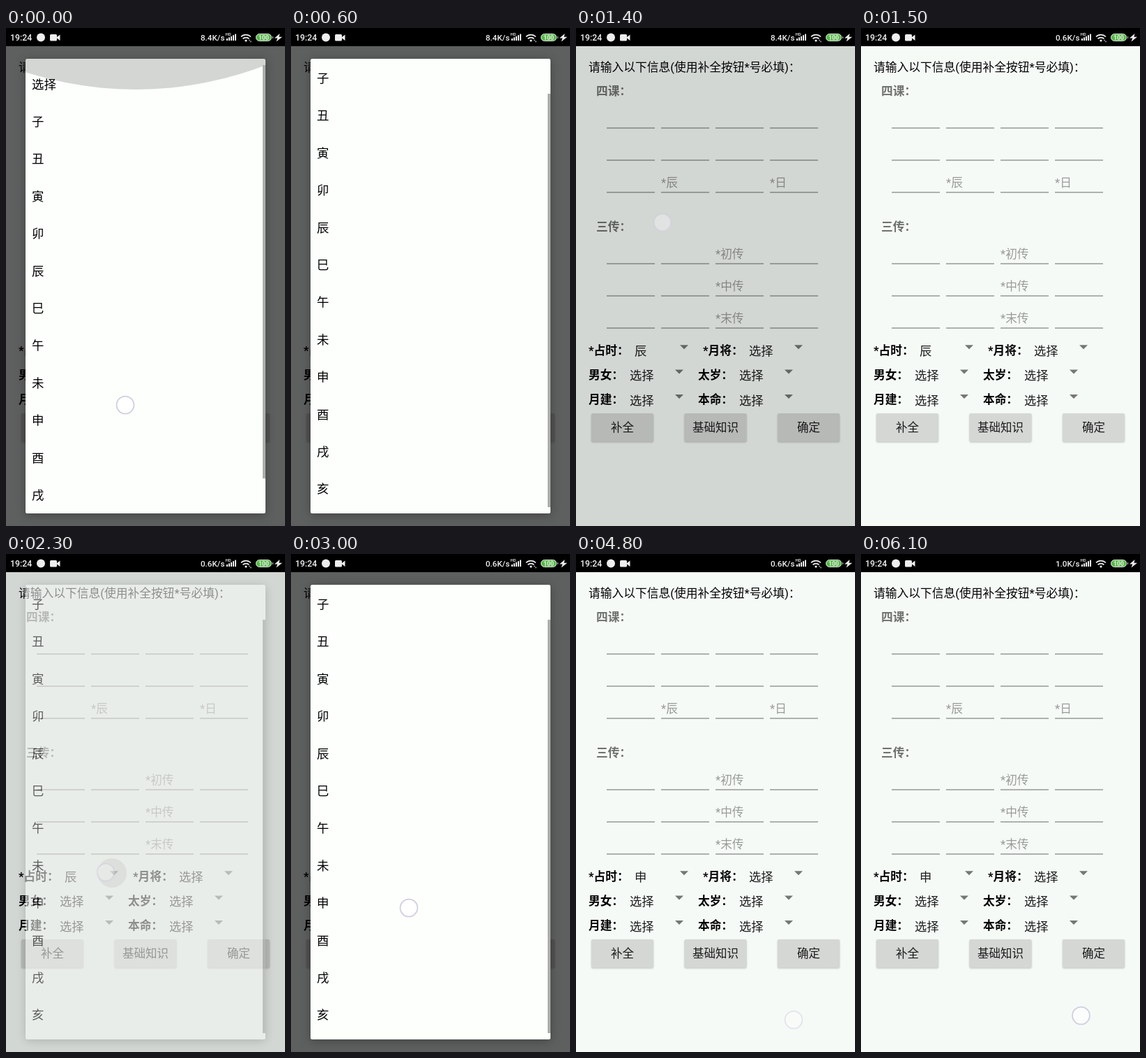
Recreate the animation shown at these times as an HTML page. Size 400x712 px, loop 6.2 s.

```html
<!DOCTYPE html>
<html lang="zh-CN">
<head>
<meta charset="utf-8">
<style>
html, body { margin: 0; width: 100%; height: 100%; overflow: hidden; background: #000; }
svg { display: block; width: 400px; height: 712px; font-family: Roboto, "Noto Sans CJK SC", "Noto Sans CJK", sans-serif; }
.bold { font-weight: bold; }
#status { font-weight: 500; }
#dialog { filter: drop-shadow(0 2px 7px rgba(0,0,0,.3)); }
#buttons rect { filter: drop-shadow(0 1px 1px rgba(0,0,0,.22)); }
</style>
</head>
<body>
<svg viewBox="0 0 400 712">
  <defs><clipPath id="panel"><rect x="28" y="44" width="344" height="650" rx="2.5"/></clipPath></defs>
  <rect y="26" width="400" height="686" fill="#f6faf7"/>
  <g id="form"></g>
  <g id="buttons"></g>
  <circle id="ripple" cx="152" cy="456" fill="#000"/>
  <rect id="dim" y="26" width="400" height="686"/>
  <g id="dialog">
    <g clip-path="url(#panel)">
      <rect x="28" y="44" width="344" height="650" fill="#fcfffc"/>
      <circle id="glow" cx="186" r="515"/>
      <g id="list"></g>
      <rect id="bar" x="368" width="4" height="591" fill="#acaeac"/>
    </g>
  </g>
  <g id="status">
    <rect width="400" height="26"/>
    <g id="icons" fill="#eee">
      <text x="6" y="18" font-size="12.3">19:24</text>
      <circle cx="50" cy="13.5" r="6"/>
      <rect x="63" y="9" width="10" height="9.5" rx="1.5"/>
      <path d="M72 13.7L77.5 9.5V18Z"/>
      <text id="speed" x="313.5" y="17.5" font-size="11.7" text-anchor="end"></text>
      <text x="314.5" y="11" font-size="6">HD</text>
      <circle cx="344" cy="18" r="1.6"/>
      <path d="M337 12.5a10 10 0 0 1 14 0M339.5 15.4a6.4 6.4 0 0 1 9 0" fill="none" stroke="#eee" stroke-width="1.7"/>
      <path id="arrows" d="M348 18.3l1-2 1 2zM350 18.7h2l-1 2z"/>
      <rect x="358.5" y="8.5" width="22" height="10" rx="5" fill="#55b947" stroke="#eee"/>
      <path d="M382 11.5q2 2 0 4z"/>
      <text x="369.5" y="16.8" font-size="8.6" class="bold" text-anchor="middle">100</text>
      <path d="M392.5 8L385 14.5h4.2L387.5 19.5 396 12.7h-4.6z"/>
    </g>
  </g>
  <circle id="touch" r="12.4" fill="#fff" fill-opacity=".6" stroke="#cfcfdf" stroke-width="1.8"/>
</svg>
<script>
const $ = id => document.getElementById(id);
const LOOP = 6200, STEP = 100, ROW = 53.38, MAX_SCROLL = 62, DIM = .615;

function set(el, attrs) {
  for (const k in attrs) el.setAttribute(k, attrs[k]);
}
function add(parent, tag, attrs, content = "") {
  const el = document.createElementNS("http://www.w3.org/2000/svg", tag);
  set(el, attrs);
  el.textContent = content;
  return parent.appendChild(el);
}
// y is the middle of the glyphs
const label = (parent, s, x, y, size = 16.75, fill = "#000", extra = {}) =>
  add(parent, "text", { x, y: y + size * .37, "font-size": size, fill, ...extra }, s);

const form = $("form"), bold = { class: "bold" };
label(form, "请输入以下信息(使用补全按钮*号必填)：", 18, 56);

// A titled block of 3 x 4 input fields; hint(row, column) gives the placeholder
function fields(title, titleY, top, hint) {
  label(form, title, 29, titleY, 16.7, "#6f726f", bold);
  for (let i = 0; i < 12; i++) {
    const row = i >> 2, col = i % 4, x = 44 + 78 * col, y = top + 46 * row;
    add(form, "rect", { x, y: y - .6, width: 69, height: 1.2, fill: "#808380" });
    label(form, hint(row, col), x, y - 14, 16.7, "#989b98");
  }
}
fields("四课：", 90, 143, (row, col) => row == 2 && col % 2 ? "*" + "辰日"[col >> 1] : "");
fields("三传：", 283.5, 337, (row, col) => col == 2 ? `*${"初中末"[row]}传` : "");

// Starred names push everything after them to the right
const values = ["*占时", "*月将", "男女", "太岁", "月建", "本命"].map((name, i) => {
  const star = name[0] == "*" ? 7 : 0;
  const x = i % 2 ? 175 + star : 18, y = 460.5 + 35.3 * (i >> 1);
  label(form, name + "：", x, y, 16.7, "#000", bold);
  add(form, "path", { d: `M${x + 124 + star} ${y - 7.2}h12l-6 6z`, fill: "#747774" });
  return label(form, "选择", x + 59 + star, y + 1, 17.3, "#1c1d1c");
});

["补全", "基础知识", "确定"].forEach((s, i) => {
  const x = 22 + 133.5 * i;
  add($("buttons"), "rect", { x, y: 551, width: 89, height: 40.5, rx: 2, fill: "#d4d7d4" });
  label($("buttons"), s, x + 44.5, 571, 16.5, "#1a1a1a", { "text-anchor": "middle" });
});

["选择", ..."子丑寅卯辰巳午未申酉戌亥"].forEach((s, i) =>
  label($("list"), s, 37, 80.3 + ROW * i, 17.4));

for (let i = 0; i < 5; i++)
  add($("icons"), "rect", { x: 316 + 3 * i, y: 15 - 1.6 * i, width: 2, height: 3 + 1.6 * i });

const ramp = (t, from, to) => Math.min(1, Math.max(0, (t - from) / (to - from)));
const easeOut = p => 1 - (1 - p) ** 2;

// Each ring moves by dx, dy while held, then fades after release
const touches = [
  { at: 0, hold: 300, x: 171, y: 539, dy: -114 },
  { at: 1200, hold: 100, x: 124, y: 278 },
  { at: 2200, hold: 0, x: 143, y: 455 },
  { at: 3000, hold: 200, x: 169, y: 506 },
  { at: 4500, hold: 200, x: 265, y: 666, dx: 47 },
  { at: 6000, hold: 200, x: 315.5, y: 660 }
];

function draw(t) {
  const second = t >= 2200;
  const opened = second ? ramp(t, 2200, 2380) : 1;
  const closing = second ? 3100 : 1200;
  set($("dialog"), { opacity: opened * (1 - ramp(t, closing, closing + 200)) });
  set($("dim"), { opacity: DIM * opened ** 2.5 * (1 - ramp(t, closing, closing + 260)) });

  const scroll = easeOut(ramp(t, 0, 500)), pull = 1 - ramp(t, 0, 400);
  set($("list"), { transform: `translate(0 ${-MAX_SCROLL * scroll})` });
  set($("bar"), { y: 53 + 41 * scroll, opacity: second ? 1 : 1 - ramp(t, 700, 1100) });
  set($("glow"), { cy: -471 + 44 * pull, opacity: .16 * pull });
  set($("ripple"), {
    r: 12 + 9 * ramp(t, 2200, 2300),
    opacity: second && t < 2400 ? .15 : 0
  });

  values[0].textContent = t < 3200 ? "辰" : "申";
  $("speed").textContent = (t < 1500 ? "8.4" : t < 5400 ? "0.6" : "1.0") + "K/s";
  set($("arrows"), { opacity: t < 5200 ? 1 : 0 });

  const { at, hold, x, y, dx = 0, dy = 0 } = touches.findLast(touch => touch.at <= t);
  const moved = ramp(t, at, at + hold), release = at + hold;
  set($("touch"), {
    cx: x + dx * moved,
    cy: y + dy * moved,
    opacity: 1 - ramp(t, release, release + 200)
  });
}

const begin = performance.now();
function frame() {
  const t = (performance.now() - begin) % LOOP;
  draw(Math.floor(t / STEP) * STEP); // the picture ticks ten times a second
  requestAnimationFrame(frame);
}
frame();
</script>
</body>
</html>
```
